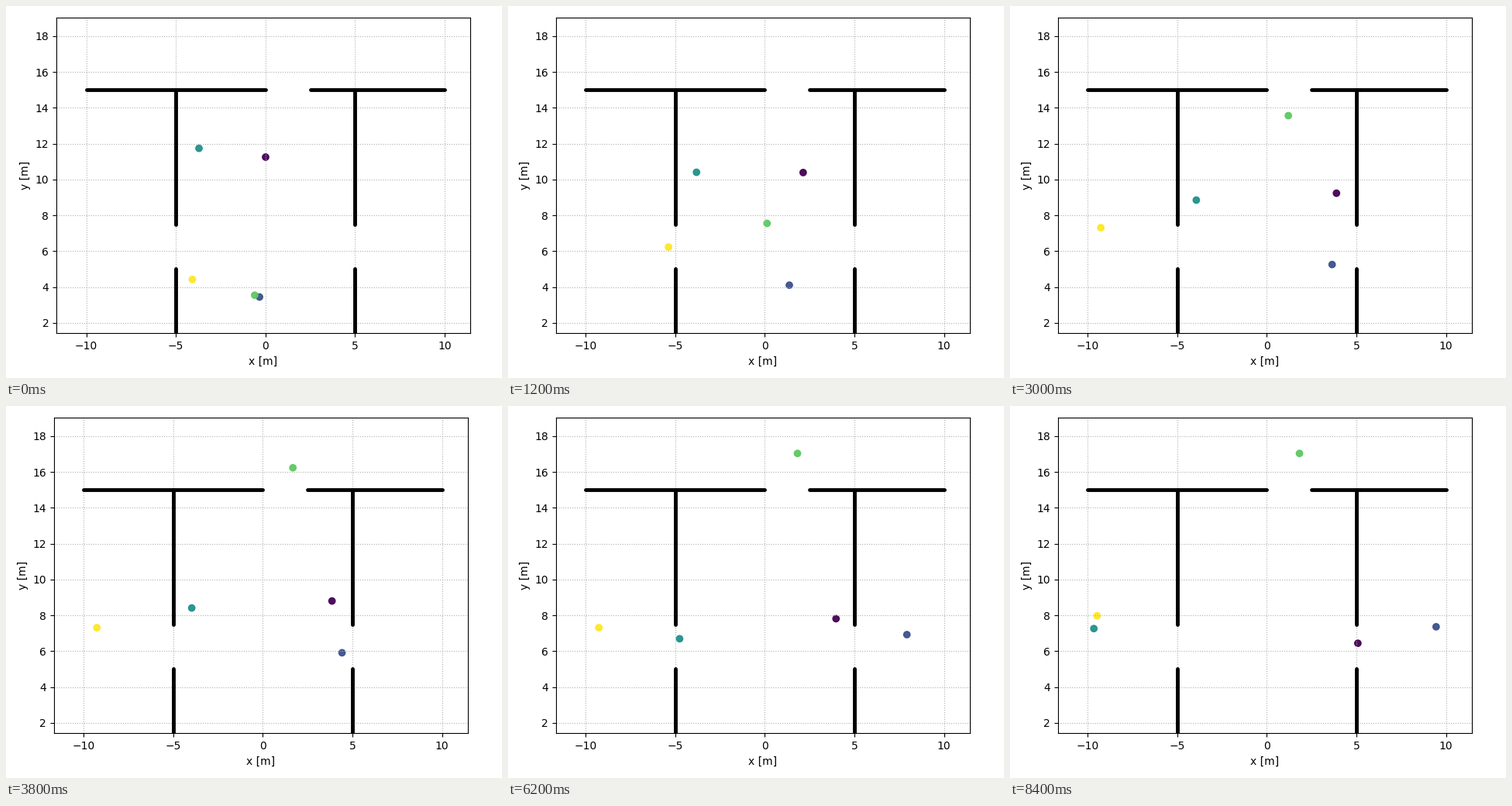
Recreate the animation shown at these times as a matplotlib script. Size 640 by 480 pixels, loop 8600 ms.

```python
import matplotlib.pyplot as plt
import numpy as np
from matplotlib.animation import FuncAnimation

FRAMES, INTERVAL = 43, 200
W, H = 640, 480
SCALE = 23.11                   # pixels per metre
AX_W, AX_H, AX_BOTTOM = 534, 407, 57.9
X_MIN, Y_MIN = -269.75 / SCALE, 32.87 / SCALE

# Turning points of each agent: (step, x, y) in metres
PATHS = [
    [(0, 0.01, 11.25), (11, 3.91, 9.67), (19, 3.86, 8.80), (36, 4.02, 7.40),
     (42, 5.08, 6.44)],
    [(0, -0.33, 3.44), (12, 3.06, 4.76), (19, 4.42, 5.91), (36.2, 9.45, 7.36)],
    [(0, -3.71, 11.74), (11, -3.91, 9.29), (28, -4.04, 7.42),
     (32, -5.00, 6.45), (36, -6.86, 6.54), (42, -9.66, 7.26)],
    [(0, -0.60, 3.54), (20.2, 1.82, 17.04)],
    [(0, -4.08, 4.42), (2, -4.05, 4.98), (5, -4.84, 6.08),
     (13.2, -9.27, 7.31), (34, -9.27, 7.31), (42, -9.48, 7.97)],
]


def position(path, step):
    t, x, y = zip(*path)
    return np.interp(step, t, x), np.interp(step, t, y)


def positions(step):
    return [position(path, step) for path in PATHS]


def place_axes(step):
    # the layout settles over the first few steps
    left = 61.7 + 3.3 * 0.39 ** step
    ax.set_position([left / W, AX_BOTTOM / H, AX_W / W, AX_H / H])


def wall(x, y):
    ax.plot(x, y, "k", linewidth=3.5, solid_capstyle="round")


fig = plt.figure(figsize=(W / 100, H / 100), dpi=100)
ax = fig.add_axes([0.1, 0.1, 0.8, 0.8])
ax.set_xlim(X_MIN, X_MIN + AX_W / SCALE)
ax.set_ylim(Y_MIN, Y_MIN + AX_H / SCALE)
ax.set_autoscale_on(False)
ax.set_xticks(range(-10, 11, 5))
ax.set_yticks(range(2, 19, 2))
ax.set_xlabel("x [m]")
ax.set_ylabel("y [m]")
ax.grid(linestyle="dotted")

wall([-10, 0], [15, 15])
wall([2.5, 10], [15, 15])
for side in (-5, 5):
    wall([side, side], [0, 5])
    wall([side, side], [7.5, 15])

dots = ax.scatter(*zip(*positions(0)), c=range(len(PATHS)), cmap="viridis",
                  alpha=0.95)


def update(step):
    place_axes(step)
    dots.set_offsets(positions(step))
    return (dots,)


anim = FuncAnimation(fig, update, frames=FRAMES, interval=INTERVAL,
                     repeat=True, repeat_delay=0, blit=False)
plt.show()
```
